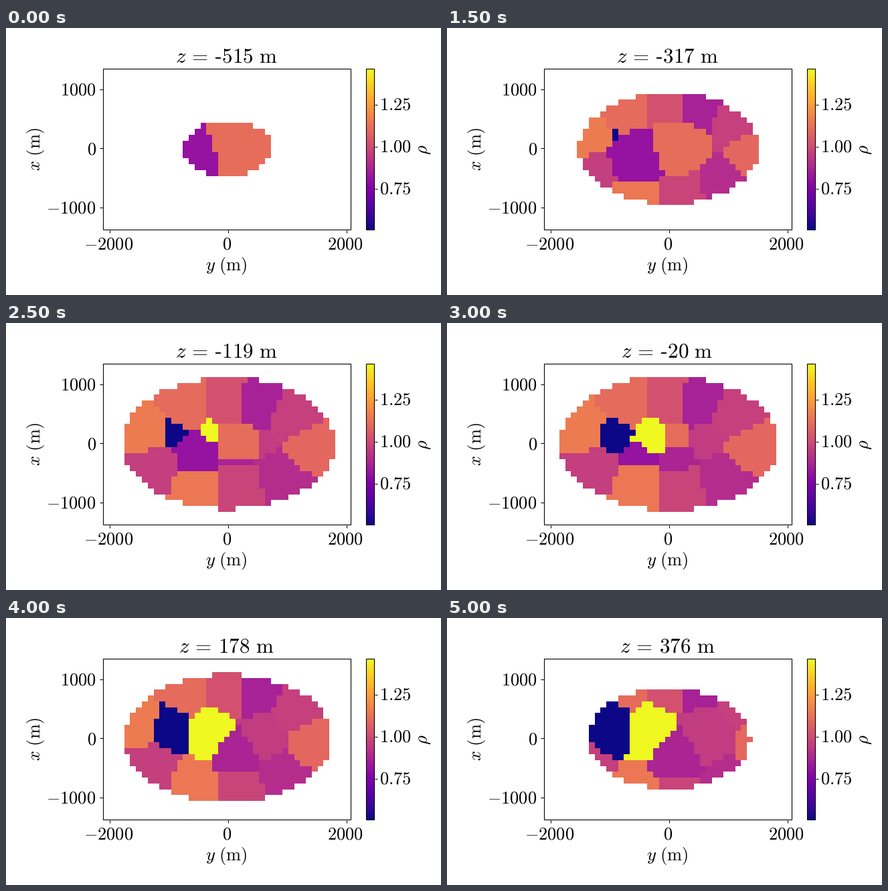
These frames come from a looping animation (650x400 px, 5500 ms). A matplotlib script:

```python
import matplotlib.pyplot as plt
import numpy as np
from matplotlib.animation import FuncAnimation
from matplotlib.patches import Rectangle

plt.rcParams["mathtext.fontset"] = "cm"

WIDTH, HEIGHT, DPI = 650, 400, 100
CELL = 99                      # voxel size in metres
COLS, ROWS, LAYERS = 37, 23, 10
RHO_MIN, RHO_MAX = 0.506, 1.462
PX_PER_M = 0.0885

# Core blocks as (column, row, layer): two low, four high
CORE = [(13.2, 13, 2), (20, 11, 1.4),
        (9.1, 9.5, 7), (15.2, 10.2, 7.8), (20, 14, 8.2), (25, 10.8, 8.2)]
CORE_RHO = [0.81, 1.11, RHO_MIN, RHO_MAX, 0.87, 0.95]
# Densities of the outer ring, clockwise from the upper left
RING_RHO = [1.10, 1.02, 0.86, 0.965, 1.09, 0.90, 0.98, 1.14, 0.96, 1.15]


def ring_seeds(count):
    """Seeds around an ellipse at mid height, closer together at top and bottom."""
    t = np.arange(count) * 2 * np.pi / count
    wobble = 6.8 * np.cos(t + 0.33) + 9 * np.cos(2 * t - 0.21)
    angle = t + np.radians(wobble - 134.3)
    return np.column_stack([18.5 + 14.4 * np.cos(angle),
                            11.5 + 7.8 * np.sin(angle),
                            np.full(count, 4.9)])


SEEDS = np.vstack([CORE, ring_seeds(len(RING_RHO))])
RHO = np.array(CORE_RHO + RING_RHO)


def height(layer):
    return CELL * layer - 515


def density_slice(layer):
    """Density of the nearest seed, blank outside the ellipsoid."""
    row, col = np.mgrid[:ROWS, :COLS]
    cells = np.stack([col + 0.5, row + 0.5, np.full(col.shape, layer)], axis=-1)
    nearest = ((cells[:, :, None] - SEEDS) ** 2).sum(axis=-1).argmin(axis=-1)
    y = CELL * (col - 18) - 20
    x = CELL * (11 - row) - 20
    inside = (y / 1840) ** 2 + (x / 1139) ** 2 + (height(layer) / 564) ** 2 < 1
    return np.where(inside, RHO[nearest], np.nan)


def title_text(layer):
    z = height(layer)
    gap = r"\hspace{0.38}" if z < 0 else ""
    return rf"$z\hspace{{0.18}}=\hspace{{0.18}}{gap}{abs(z)}\ \mathrm{{m}}$"


fig = plt.figure(figsize=(WIDTH / DPI, HEIGHT / DPI), dpi=DPI, facecolor="white")
ax = fig.add_axes([0, 0, 1, 1])
ax.axis("off")


def image(data, left, right, top, bottom):
    return ax.imshow(data, cmap="plasma", vmin=RHO_MIN, vmax=RHO_MAX, aspect="auto",
                     interpolation="nearest", extent=(left, right, bottom, top))


def frame_box(left, right, top, bottom):
    ax.add_patch(Rectangle((left, top), right - left, bottom - top, fill=False,
                           edgecolor="black", linewidth=0.8, zorder=3))


def label(x, y, text, size=19, ha="center", rotation=0):
    return ax.text(x, y, text, fontsize=size, ha=ha, va="baseline",
                   rotation=rotation, rotation_mode="anchor")


def tick(xs, ys):
    ax.plot(xs, ys, color="black", linewidth=0.8, solid_capstyle="butt")


body = image(density_slice(0), 167.9, 491.9, 80.75, 282.65)
image(np.linspace(RHO_MAX, RHO_MIN, 256)[:, None], 538, 550, 61, 302)
frame_box(145, 515, 61, 302)
frame_box(538, 550, 61, 302)

for step in (-1, 0, 1):
    x = 331.7 + 2000 * step * PX_PER_M
    tick([x, x], [302.5, 307.4])
    label(x - 1.5, 331, f"${2000 * step}$")

    y = 180.4 - 1000 * step * PX_PER_M
    tick([140.4, 145], [y, y])
    label(134.7, y + 9, f"${1000 * step}$", ha="right")

    y = 177.6 - 63 * step
    tick([550.5, 555.2], [y, y])
    label(558, y + 7.7, f"${1 + step / 4:.2f}$", ha="left")

label(329, 363, r"$y\ \mathrm{(m)}$")
label(50.7, 181.7, r"$x\ \mathrm{(m)}$", rotation=90)
label(630, 182, r"$\rho$", rotation=90)
title = label(329, 52, title_text(0), size=22.4)
hyphen = ax.add_patch(Rectangle((0, 44.2), 8, 1.8, color="black", linewidth=0))

ax.set_xlim(0, WIDTH)
ax.set_ylim(HEIGHT, 0)


def update(step):
    layer = max(step - 1, 0)   # the lowest slice is held twice as long
    z = height(layer)
    body.set_data(density_slice(layer))
    title.set_text(title_text(layer))
    hyphen.set_visible(z < 0)
    hyphen.set_x(312.5 + 7.8 * (3 - len(str(abs(z)))))
    return body, title, hyphen


anim = FuncAnimation(fig, update, frames=LAYERS + 1, interval=500, repeat=True)
plt.show()
```
